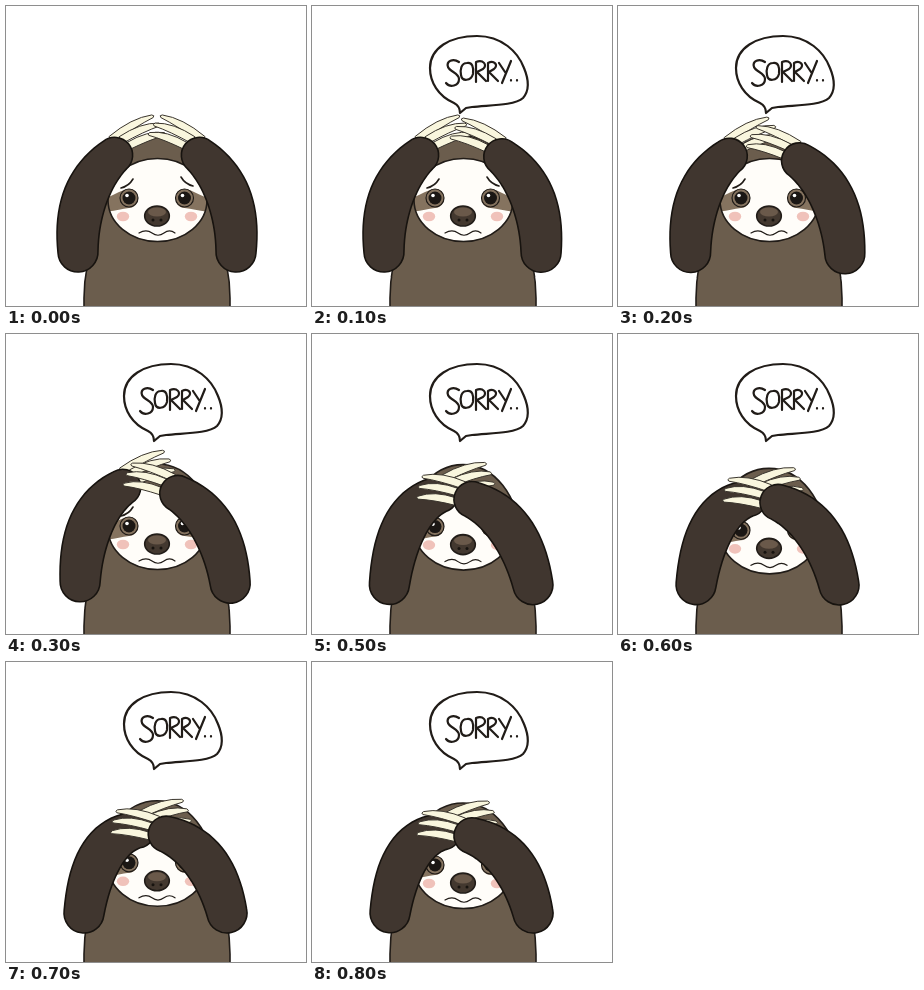
These frames come from a looping animation (300 by 300 pixels, 1270 ms). An HTML page:

```html
<!DOCTYPE html>
<html lang="en">
<head>
<meta charset="utf-8">
<title>Sorry</title>
<style>
  html, body { margin: 0; width: 100%; height: 100%; overflow: hidden; background: #fff; }
  svg { display: block; width: 100vw; height: 100vh; }
  .line { fill: none; stroke: #211c18; stroke-width: 1.6; stroke-linecap: round; stroke-linejoin: round; }
  .thin { stroke-width: 1.2; }
  .pen { stroke-width: 2.2; }
  .fur { fill: #6b5d4d; }
  .arm { fill: #40362f; stroke: #17130f; stroke-width: 1.6; }
  .claw { fill: #f9f6de; stroke: #3a352e; stroke-width: 1; stroke-linejoin: round; }
</style>
</head>
<body>
<svg viewBox="0 0 300 300">
  <defs>
    <clipPath id="faceClip"><ellipse cx="151.5" cy="194" rx="49.5" ry="41.5"/></clipPath>
    <g id="eye">
      <path d="M98 192C108 190 114 184 123 183C135 183 135 201 123 202C115 203 108 205 98 206Z" fill="#85735f"/>
      <circle class="line thin" cx="123" cy="192" r="9"/>
      <circle cx="123" cy="192" r="6.5" fill="#1b1714"/>
    </g>
  </defs>

  <path class="line" d="M78 304V292C78 252 92 234 95 205H207C210 234 224 252 224 292V304Z" style="fill:#6b5d4d"/>

  <g id="head">
    <path class="fur" d="M94 206C94 160 121 130 151 130S208 160 208 206Z"/>
    <path class="line" d="M94 206C94 160 121 130 151 130S208 160 208 206"/>
    <ellipse cx="151.5" cy="194" rx="49.5" ry="41.5" fill="#fffdf9"/>
    <g clip-path="url(#faceClip)">
      <use href="#eye"/>
      <use href="#eye" transform="matrix(-1 0 0 1 301.5 0)"/>
    </g>
    <ellipse class="line" cx="151.5" cy="194" rx="49.5" ry="41.5"/>
    <g fill="#f0c2ba">
      <ellipse cx="117" cy="210.5" rx="6.2" ry="4.8"/>
      <ellipse cx="185" cy="210.5" rx="6.2" ry="4.8"/>
    </g>
    <g fill="#fff">
      <circle cx="121" cy="189.5" r="1.8"/>
      <circle cx="176.5" cy="189.5" r="1.8"/>
    </g>
    <path class="line" d="M115 182Q123 180 127 173M175 171Q179 178 187 180"/>
    <ellipse class="line" cx="151" cy="210" rx="12.3" ry="10" style="fill:#43382f"/>
    <ellipse cx="151" cy="206" rx="9" ry="4.5" fill="#6a594a"/>
    <g fill="#17130f"><circle cx="147" cy="214" r="1.5"/><circle cx="155" cy="214" r="1.5"/></g>
    <path class="line thin" d="M133 227C138 224 142 224 146 227S154 230 158 227S165 224 169 227"/>
  </g>

  <g id="left"></g>
  <g id="right" transform="matrix(-1 0 0 1 302 0)"></g>

  <g id="bubble" role="img" aria-label="SORRY..">
    <path class="line pen" d="M142 97C126 90 118 76 118 62C118 42 138 30 165 30C190 30 206 46 212 62C217 74 218 84 211 92C202 100 175 99 160 101L154 102L148 107Q148 100 142 97Z"/>
    <path class="line pen" d="M147 56C141 52 134 55 136 61C138 66 147 67 147 73C147 80 138 82 134 77
      M155 57C149 57 148 64 149 69C150 76 159 75 161 68C162 61 160 56 155 57
      M164 76V56C171 53 176 59 171 63L165 66L174 75
      M176 75V57C182 54 187 59 182 63L177 66L186 75
      M187 57L193 66M199 55L190 77M199 74v.6M205 74v.6"/>
  </g>
</svg>
<script>
const LOOP = 1270, STEP = 100, LAST = 800;
const $ = id => document.getElementById(id);

// Spine key points (elbow, bend, hand) in left-arm space; the right arm is mirrored.
const raised = { spine: [[72, 246], [69, 182], [109, 149]], aim: 35 };
const arms = [
  { el: $('left'), delay: 100, low: { spine: [[78, 251], [88, 172], [131, 161]], aim: 22 } },
  { el: $('right'), delay: 0, low: { spine: [[81, 251], [95, 184], [142, 165]], aim: 14 } }
];

function add(parent, cls) {
  const p = document.createElementNS('http://www.w3.org/2000/svg', 'path');
  p.setAttribute('class', cls);
  return parent.appendChild(p);
}
for (const a of arms) {
  a.claws = [0, 1, 2].map(() => add(a.el, 'claw'));
  a.shape = add(a.el, 'arm');
}

const mix = (a, b, k) => a + (b - a) * k;
const ease = x => { x = Math.max(0, Math.min(1, x)); return x * x * (3 - 2 * x); };
const at = (x, y) => x.toFixed(2) + ' ' + y.toFixed(2);

// A limb: offsets both sides of a quadratic spine, with round ends.
function limb([a, b, c]) {
  const n = 20, one = [], two = [];
  const radius = t => 20 + 3 * Math.sin(Math.PI * t) - 2 * t;
  for (let i = 0; i <= n; i++) {
    const t = i / n, r = radius(t);
    const [x, y] = [0, 1].map(j => mix(mix(a[j], b[j], t), mix(b[j], c[j], t), t));
    const [dx, dy] = [0, 1].map(j => mix(b[j] - a[j], c[j] - b[j], t));
    const s = r / Math.hypot(dx, dy);
    one.push(at(x + dy * s, y - dx * s));
    two.unshift(at(x - dy * s, y + dx * s));
  }
  const cap = (r, p) => `A${r} ${r} 0 0 1 ${p}`;
  return 'M' + one.join('L') + cap(radius(1), two[0]) +
    'L' + two.join('L') + cap(radius(0), one[0]) + 'Z';
}

function polar([x, y], dist, deg) {
  const a = deg * Math.PI / 180;
  return [x + dist * Math.cos(a), y - dist * Math.sin(a)];
}

// A curved, pointed claw bulging upwards.
function claw([x, y], [tx, ty]) {
  const dx = tx - x, dy = ty - y, len = Math.hypot(dx, dy);
  const off = (k, w) => at(x + dx * k + dy / len * w, y + dy * k - dx / len * w);
  return `M${off(0, 3.5)}Q${off(.6, 8.5)} ${off(1, 1)}` +
    `Q${off(1.06, -1)} ${off(1, -2)}Q${off(.6, -1)} ${off(0, -4)}Z`;
}

function draw(t) {
  const dip = 11 * ease((t - 450) / 350);
  $('head').setAttribute('transform', `translate(0 ${dip})`);
  $('bubble').style.display = t ? '' : 'none';
  for (const { low, delay, shape, claws } of arms) {
    const k = ease((t - delay) / 500);
    const spine = raised.spine.map(([x, y], i) =>
      [mix(x, low.spine[i][0], k), mix(y, low.spine[i][1], k) + dip * .4 * i]);
    const aim = mix(raised.aim, low.aim, k);
    shape.setAttribute('d', limb(spine));
    claws.forEach((el, i) => {
      const root = polar(spine[2], 16, 2 * aim + 35 * (1 - i));
      const tip = polar(spine[2], 54, aim + 11.5 * (1 - i));
      el.setAttribute('d', claw(root, tip));
    });
  }
}

const start = performance.now();
function tick() {
  const t = (performance.now() - start) % LOOP;
  draw(Math.min(LAST, Math.floor(t / STEP) * STEP));
  requestAnimationFrame(tick);
}
tick();
</script>
</body>
</html>
```
